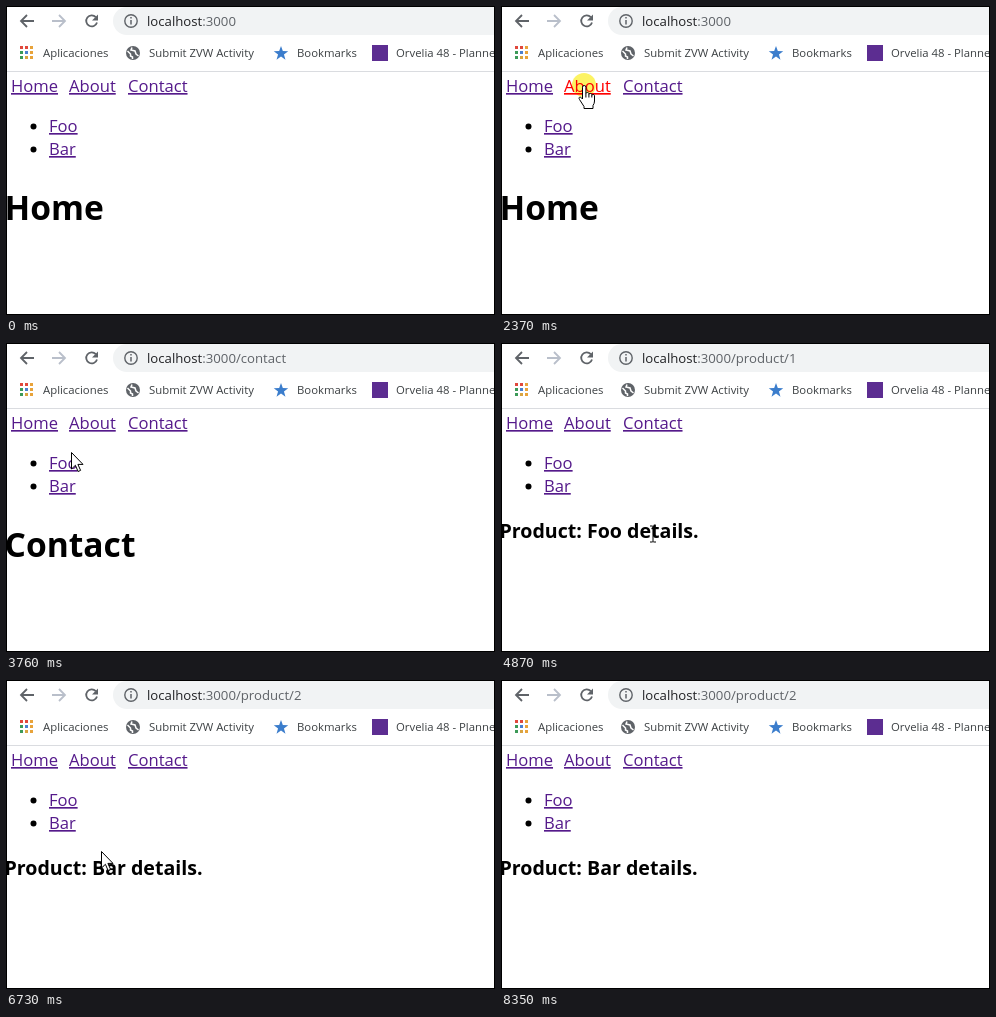
These frames come from a looping animation (489 px wide and 309 px high, 8900 ms). An HTML page:

```html
<!DOCTYPE html>
<html lang="es">
<head>
<meta charset="utf-8">
<title>Router demo</title>
<style>
  html, body { margin: 0; width: 100%; height: 100%; overflow: hidden; background: #fff; }
  svg { display: block; font-family: "Open Sans", "Noto Sans", sans-serif; }
  .bookmark { font-size: 11.35px; fill: #3c4043; }
  .url { font-size: 13.2px; fill: #202124; }
  .url tspan { fill: #5f6368; }
  .link { font-size: 16.6px; fill: #551a8b; text-decoration: underline 1px; text-underline-offset: 2px; }
  .link.active { fill: #f00; }
  .title { font-weight: 700; }
  .icon { fill: none; stroke: #5f6368; stroke-width: 1.8; }
  .cursor { fill: #fff; stroke: #000; stroke-width: 1; stroke-linejoin: round; }
</style>
</head>
<body>
<svg width="489" height="309" viewBox="0 0 489 309">
  <rect width="489" height="309" fill="#fff"/>

  <!-- toolbar -->
  <rect x="107" y="1" width="420" height="28" rx="14" fill="#f1f3f4"/>
  <path class="icon" d="M28 15H15.5M21 9l-6 6 6 6"/>
  <path class="icon" d="M46 15h12.500M53 9l6 6-6 6" style="stroke:#b9bfca"/>
  <path class="icon" d="M89.800 11.200a5.500 5.500 0 1 0 1.200 5.300"/>
  <path d="M92 8.500v6h-6z" fill="#5f6368"/>
  <circle class="icon" cx="125" cy="15" r="6.200" style="stroke-width:1.400"/>
  <path class="icon" d="M125 14v4.500M125 11v1.600" style="stroke-width:1.500"/>
  <text class="url" x="141" y="20">localhost<tspan id="path"></tspan></text>

  <!-- bookmarks -->
  <g id="apps"></g>
  <text class="bookmark" x="37" y="51">Aplicaciones</text>
  <circle cx="127" cy="47" r="7" fill="#5f6368"/>
  <path d="M121.500 45l3 3v2l2 1v2M126 41.500l-1 2.500 4 1 1 3 2.500 2" fill="none" stroke="#fff" stroke-width="1.500"/>
  <text class="bookmark" x="143" y="51">Submit ZVW Activity</text>
  <path id="star" fill="#3b7dcc"/>
  <text class="bookmark" x="291" y="51">Bookmarks</text>
  <rect x="366" y="39" width="16" height="16" fill="#5c2d91"/>
  <text class="bookmark" x="390" y="51">Orvelia 48 - Planner</text>
  <path d="M0 65.500H489" stroke="#dadce0"/>

  <!-- page -->
  <g id="links"></g>
  <circle cx="27.500" cy="120.500" r="3"/>
  <circle cx="27.500" cy="143.500" r="3"/>
  <text id="title" class="title" x="-1.500"></text>

  <!-- pointer -->
  <circle id="glow" r="12" fill="#fbf03c" fill-opacity=".8" style="mix-blend-mode:multiply"/>
  <g id="pointer">
    <path id="arrow" class="cursor" d="M.5.5V17l3.900-3.700 2.700 6.200 2.500-1.100-2.700-6H12z"/>
    <path id="hand" class="cursor" d="M-1.500 14V2.200a1.700 1.700 0 0 1 3.400 0V8.500a1.600 1.600 0 0 1 3 0v1a1.500 1.500 0 0 1 2.900 0v1a1.400 1.400 0 0 1 2.700 0V16q0 2.500-1.500 4.500v3H0v-2L-4.500 14.500C-6 12-3.500 11-1.500 14zM1.900 8.500v4M4.900 9.500v3M7.800 10.500v2"/>
    <path id="beam" class="cursor" style="fill:none" d="M-3-8h2.200L0-7.500.8-8H3M0-7.500v15M-3 8h2.200L0 7.500.8 8H3"/>
  </g>
  <rect x=".5" y=".5" width="488" height="308" fill="none" stroke="#000"/>
</svg>
<script>
const LOOP = 8900;
const $ = id => document.getElementById(id);

function add(parent, tag, attrs, text = '') {
  const el = document.createElementNS('http://www.w3.org/2000/svg', tag);
  for (const name in attrs) el.setAttribute(name, attrs[name]);
  el.textContent = text;
  return parent.appendChild(el);
}

const appColors = ['#e0483c', '#e0483c', '#e8a33a', '#3c9a58', '#4a80d0', '#e8a33a', '#3c9a58', '#d9a441', '#e8a33a'];
appColors.forEach((fill, i) =>
  add($('apps'), 'rect', { x: 14 + i % 3 * 5, y: 40 + Math.floor(i / 3) * 5, width: 3, height: 3, fill }));

$('star').setAttribute('d', 'M' + Array.from({ length: 10 }, (_, i) => {
  const r = i % 2 ? 3.1 : 7.6, a = i * Math.PI / 5;
  return [275 + r * Math.sin(a), 47.5 - r * Math.cos(a)].map(v => v.toFixed(2));
}).join('L') + 'z');

const links = [
  ['Home', 5, 86, 47], ['About', 63, 86, 48], ['Contact', 122, 86, 60],
  ['Foo', 43, 126, 29], ['Bar', 43, 149, 25],
].map(([name, x, y, width]) =>
  ({ name, x, y, width, el: add($('links'), 'text', { class: 'link', x, y }, name) }));

const pages = [
  [0, '', 'Home'], [2450, '/about', 'About'], [3060, '/contact', 'Contact'],
  [4150, '/product/1', 'Product: Foo details.'], [6030, '/product/2', 'Product: Bar details.'],
  [7270, '/product/1', 'Product: Foo details.'], [7820, '/product/2', 'Product: Bar details.'],
];

// start, end, link held down
const presses = [
  [2370, 2450, 'About'], [2980, 3060, 'Contact'], [4080, 4150, 'Foo'],
  [5950, 6030, 'Bar'], [7190, 7270, 'Foo'], [7650, 7820, 'Bar'],
];

// start, time of last step, number of steps, evenly timed waypoints
const moves = [
  [530, 610, 2, [[388, 273], [385, 258]]],
  [840, 1680, 12, [[350, 238], [229.5, 166.5], [70, 122], [31, 108], [42, 91]]],
  [1760, 2295, 8, [[51, 88], [72, 82], [83, 79]]],
  [2450, 2905, 7, [[85, 80], [116, 80], [156, 76]]],
  [3360, 3910, 8, [[146, 79], [82, 102], [52, 116]]],
  [4380, 4870, 7, [[60, 122], [108, 160], [151.5, 190.5]]],
  [5020, 5880, 12, [[148, 189], [112, 177], [70, 162], [50, 148]]],
  [6200, 7040, 12, [[56, 156], [100, 198], [118, 203], [73, 142], [57, 121]]],
  [7340, 7420, 2, [[57, 130], [56, 142]]],
  [7820, 8350, 8, [[75, 158], [260, 235], [490, 330]]],
];

// Catmull-Rom curve through the waypoints, p from 0 to 1
function along(points, p) {
  const last = points.length - 1;
  const i = Math.min(Math.floor(p * last), last - 1), u = p * last - i;
  const at = k => points[Math.max(0, Math.min(last, k))];
  return [0, 1].map(axis => {
    const [a, b, c, d] = [-1, 0, 1, 2].map(k => at(i + k)[axis]);
    return b + u * ((c - a) + u * ((2 * a - 5 * b + 4 * c - d) + u * (3 * b - a - 3 * c + d))) / 2;
  });
}

const latest = (list, t) => list.filter(([start]) => start <= t).pop();

function pointerAt(t) {
  const move = latest(moves, t);
  if (!move || t >= 8350) return null;
  const [start, end, steps, points] = move;
  const step = Math.floor((t - start) / (end - start) * (steps - 1) + 0.1);
  return along(points, Math.min(1, step / (steps - 1)));
}

function cursorFor(x, y, title) {
  if (links.some(l => x >= l.x - 1 && x <= l.x + l.width && y > l.y - 16 && y < l.y + 6)) return 'hand';
  const product = title.startsWith('Product');
  const overTitle = product ? x < 198 && y > 171 && y < 203 : x < 128 && y > 178 && y < 226;
  return overTitle ? 'beam' : 'arrow';
}

const show = (el, on) => el.setAttribute('visibility', on ? 'visible' : 'hidden');

function render(t) {
  const [, path, title] = latest(pages, t);
  const product = title.startsWith('Product');
  $('path').textContent = ':3000' + path;
  $('title').textContent = title;
  $('title').setAttribute('y', product ? 195 : 214);
  $('title').setAttribute('font-size', product ? 19.6 : 33.6);

  const press = presses.find(([start, end]) => t >= start && t < end);
  for (const l of links) l.el.classList.toggle('active', !!press && press[2] === l.name);

  const pos = pointerAt(t);
  const kind = pos && cursorFor(...pos, title);
  for (const id of ['arrow', 'hand', 'beam']) show($(id), id === kind);
  show($('glow'), !!press);
  if (pos) for (const id of ['pointer', 'glow']) $(id).setAttribute('transform', `translate(${pos.map(Math.round)})`);
}

const origin = performance.now();
function tick() {
  render((performance.now() - origin) % LOOP);
  requestAnimationFrame(tick);
}
tick();
</script>
</body>
</html>
```
